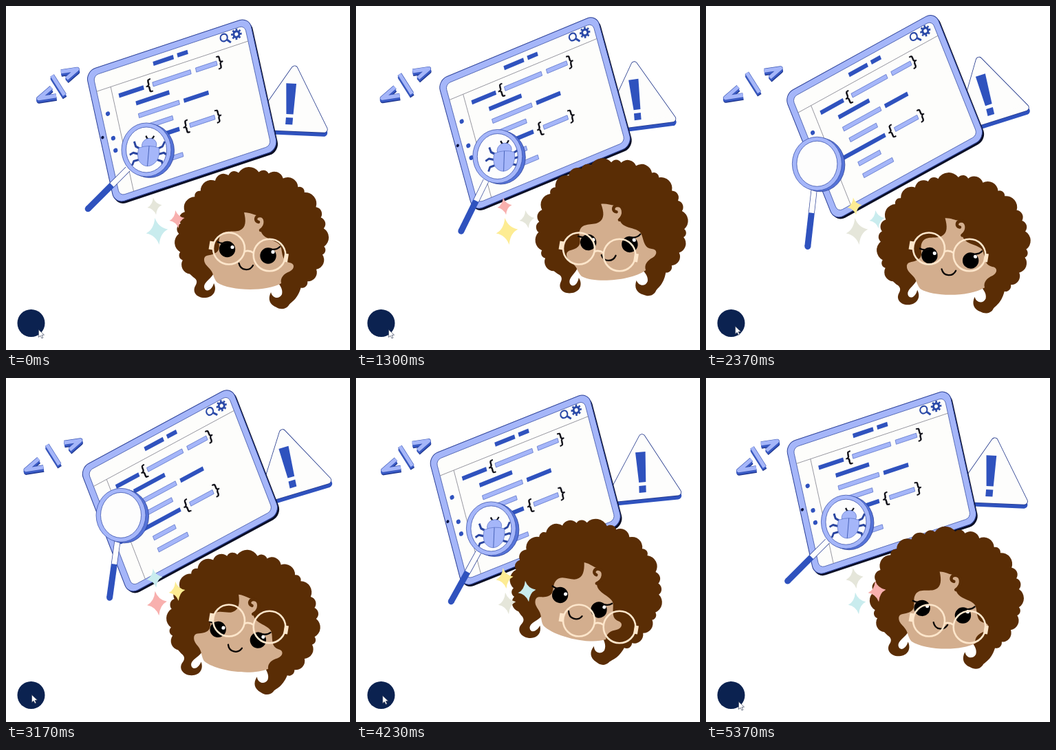
Write an HTML page that moves like this. It is 500x500 px and loops after 5.41 s.

```html
<!DOCTYPE html>
<html lang="en">
<head>
<meta charset="utf-8">
<title>Debugging</title>
<style>
  html, body { margin: 0; width: 100%; height: 100%; overflow: hidden; background: #fff; }
  svg { display: block; width: 100vw; height: 100vh; }
  .dark { fill: #2f52be; }
  .light { fill: #a5b6f9; stroke: #5a72c8; stroke-width: .7; }
  .line { fill: none; stroke: #8a8a94; stroke-width: .8; }
  .brace { font: 21px "DejaVu Sans", sans-serif; fill: #0c0c14; stroke: #0c0c14; stroke-width: .5; text-anchor: middle; }
  .icon { fill: none; stroke: #2b4aa8; }
  .leg { fill: none; stroke: #2b46a0; stroke-width: 3; stroke-linejoin: round; }
  .hair { fill: #5a2d05; }
  .ink { fill: none; stroke: #0a0706; stroke-width: 2.3; stroke-linecap: round; }
  .glasses { fill: none; stroke: #fde6cb; stroke-width: 2.6; }
</style>
</head>
<body>
<svg viewBox="0 0 500 500">
  <defs><clipPath id="view"><ellipse id="hole" rx="29.5" ry="33"/></clipPath></defs>

  <g id="sign" stroke-linejoin="round" stroke-width="10">
    <path d="M0 8L50 97H-50Z" fill="#2f52be" stroke="#2f52be"/>
    <path d="M0 7L50 92H-50Z" fill="#fdfdfc" stroke="#22388c"/>
    <path d="M0 7L50 92H-50Z" fill="#fdfdfc" stroke="#fdfdfc" stroke-width="8.4"/>
    <path fill="#2f52be" stroke="none" d="M-10 28H4.5L4 72H-6ZM-6 77H4V87H-6Z"/>
  </g>

  <g id="code" fill="none" stroke-linejoin="round" stroke-width="6.6"></g>

  <g id="tablet">
    <rect x=".5" y="2.5" width="250.5" height="197.5" rx="15" fill="#0b0f26"/>
    <rect x="-1" y="-1" width="250.5" height="197.5" rx="15" fill="#a5b6f9" stroke="#2a3f96" stroke-width="1"/>
    <rect x="8.5" y="8.5" width="232" height="179" rx="8" fill="#fdfdfb" stroke="#4a5fae" stroke-width=".8"/>
    <path class="line" d="M8.5 32H240.5M30 32V187.5"/>
    <g id="rows"></g>
    <g class="dark"><circle cx="17.5" cy="68" r="3.2"/><circle cx="17.5" cy="104.5" r="3.2"/><circle cx="17" cy="122.5" r="3.2"/></g>
    <circle cx="2.5" cy="98.5" r="2.2" fill="#0b1440"/>
    <g class="icon">
      <circle cx="207" cy="16" r="5.2" stroke-width="2.2"/>
      <path d="M210.5 20L215.5 26" stroke-width="2.8"/>
      <circle cx="226" cy="17" r="4.2" stroke-width="3.2"/>
      <circle cx="226" cy="17" r="6.6" stroke-width="2.8" stroke-dasharray="2.592"/>
    </g>
  </g>

  <g id="handle">
    <path d="M0 38V71" stroke="#2a3f96" stroke-width="9"/>
    <path d="M0 37V71" stroke="#fdfdfd" stroke-width="7.6"/>
    <path d="M0 71V120" stroke="#2f52be" stroke-width="9"/>
    <circle cy="120" r="4.5" class="dark"/>
  </g>
  <g id="lens">
    <ellipse cx="4.5" cy="1.5" rx="36" ry="39" fill="#5573d8" stroke="#2a3f96" stroke-width=".8"/>
    <ellipse rx="36" ry="39" fill="#a5b6f9" stroke="#3b54ae" stroke-width=".8"/>
    <ellipse rx="29.5" ry="33" fill="#fdfdfd" stroke="#3b54ae" stroke-width=".8"/>
  </g>
  <g clip-path="url(#view)">
    <g id="bug">
      <g transform="translate(64 139) rotate(18)">
        <g id="legs"></g>
        <path d="M-6 -22Q-4 -17 -1 -17M6 -22Q4 -17 1 -17" fill="none" stroke="#10131f" stroke-width="2.4"/>
        <ellipse cy="-9" rx="11" ry="9.5" class="light"/>
        <path class="light" d="M-15 -5Q0 -10 15 -5Q18 5 13 14Q7 21 0 21Q-7 21 -13 14Q-18 5 -15 -5Z"/>
        <path d="M0 -7.5V21" stroke="#4560b8" stroke-width="1"/>
      </g>
    </g>
  </g>

  <g id="head">
    <path id="curls" class="hair"/>
    <path fill="#d3ae8e" d="M346 300C349 312 349 322 340 326C332 330 318 324 312 333C306 342 314 352 306 358C298 364 290 360 288 367C287 377 297 380 300 388C303 396 304 399 307 402C325 414 377 416 400 403C398 395 404 389 412 386C420 382 420 374 412 373C402 371 402 362 400 352C398 338 371 342 370 324C379 315 377 303 368 304C361 305 356 300 346 300Z"/>
    <path d="M370 326C380 319 378 305 369 305C362 305 361 313 367 314" fill="none" stroke="#5a2d05" stroke-width="4.5" stroke-linecap="round"/>
    <circle cx="321.5" cy="353.5" r="11.7"/><circle cx="381" cy="363" r="11.7"/>
    <path class="ink" d="M308 343Q313 346 320 344.5M384 353.5Q393 355 398 350"/>
    <g fill="#fff"><circle cx="329" cy="350.5" r="2.6"/><circle cx="388" cy="357.5" r="2.6"/></g>
    <path class="ink" d="M338.5 374C341 385 354 386 359 377"/>
  </g>

  <g class="glasses">
    <circle cx="324" cy="352.5" r="23"/><circle cx="383" cy="362" r="23.3"/>
    <path d="M346.5 357Q353 354 360 359"/>
    <path d="M299.5 342L297.5 354M408 360L406 372" stroke-width="6"/>
  </g>

  <g id="sparks"></g>

  <circle cx="36.5" cy="461" r="20" fill="#0b2250"/>
  <path id="cursor" d="M0 0L0 11L2.6 8.8L4.6 12.6L6.4 11.7L4.5 8L8 7.6Z" fill="#fff" stroke="#39435c" stroke-width=".7"/>
</svg>

<script>
const T = 5410, TAU = 2 * Math.PI;
const $ = id => document.getElementById(id);
const place = (el, value) => el.setAttribute('transform', value);
const rad = deg => deg * Math.PI / 180;
const clamp = v => Math.max(0, Math.min(1, v));
const smooth = v => v * v * (3 - 2 * v);

// Mean plus cosine and sine parts of the first harmonics of the loop.
const wave = (t, mean, ...parts) => parts.reduce((sum, p, i) => {
  const angle = TAU * t / T * (1 + (i >> 1));
  return sum + p * (i % 2 ? Math.sin(angle) : Math.cos(angle));
}, mean);

// Smooth curve through rows of [time, ...values].
function track(rows, t) {
  const at = i => rows[Math.max(0, Math.min(rows.length - 1, i))];
  const i = Math.max(0, rows.findLastIndex(r => r[0] <= t));
  const [p, a, b, q] = [at(i - 1), at(i), at(i + 1), at(i + 2)];
  const h = b[0] - a[0];
  if (!h) return a.slice(1);
  const s = (t - a[0]) / h, e = smooth(s);
  return a.slice(1).map((v, j) => {
    const k = j + 1;
    const m = (b[k] - p[k]) / (b[0] - p[0]) * h;
    const n = (q[k] - v) / (q[0] - a[0]) * h;
    return v + (b[k] - v) * e + s * (1 - s) * (m * (1 - s) - n * s);
  });
}

// Head: time, point between the eyes, tilt
const HEAD = [
  [0, 351.5, 358.5, 8.7], [300, 366, 350, 3], [830, 339, 342.5, 18.7], [1400, 372, 346, 0],
  [1770, 358, 349, 5.9], [2370, 355, 366.5, 6.7], [2860, 377, 371, -1],
  [3170, 337.5, 373.5, 14.7], [3650, 371, 350, 1], [4230, 325, 326.5, 20.6], [5370, 344, 340, 9.8]];

// Code lines at an even pitch; each bar is a start and a length.
const bar = (cls, x, y, w) => `<rect class="${cls}" x="${x}" y="${y - 3}" width="${w}" height="6.2"/>`;
const brace = (c, x, y) => `<text class="brace" x="${x}" y="${y + 6.5}">${c}</text>`;
const LINES = [
  { dark: [39, 38], light: [91, 58, 157, 32], braces: [85, 194] },
  { dark: [61, 51] },
  { light: [61, 62], dark: [130, 38] },
  { light: [64, 45] },
  { dark: [45, 70], light: [131, 38], braces: [125, 175] },
  { light: [63, 36] },
  { light: [63, 49] }];
$('rows').innerHTML = bar('dark', 98, 19.5, 31) + bar('dark', 135, 19, 16) +
  LINES.map(({ dark = [], light = [], braces = [] }, i) => {
    const y = 48 + 18.5 * i;
    const bars = (cls, list) => list.map((x, j) => j % 2 ? '' : bar(cls, x, y, list[j + 1])).join('');
    return bars('dark', dark) + bars('light', light) + braces.map((x, j) => brace('{}'[j], x, y)).join('');
  }).join('');

$('legs').innerHTML = [1, -1].map(s =>
  `<path class="leg" transform="scale(${s} 1)" d="M14 -4L20 -7L23 -14M15 4L23 2L28 5M14 12L21 14L23 20"/>`).join('');

// Hair: uneven scallops round an ellipse, then the two hooked ends.
function hairPath(count = 23) {
  let d = '', px, py;
  for (let i = 0; i <= count; i++) {
    const angle = rad(148 + 262 * (i + .22 * Math.sin(2.4 * i)) / count);
    const x = 357 + 106 * Math.cos(angle), y = 338 + 97 * Math.sin(angle);
    const r = Math.hypot(x - px, y - py) * .6;
    d += i ? `A${r} ${r} 0 0 1 ${x} ${y}` : `M${x} ${y}`;
    [px, py] = [x, y];
  }
  return d + 'C423 428 414 430 411 435C406 442 398 441 393 438C383 434 380 426 385 416C387 425 397 427 401 419' +
    'C403 411 397 405 394 400L390 380H312L301 390C297 397 287 402 288 409C290 417 299 414 302 403' +
    'C307 413 302 423 290 424C278 425 270 416 275 407C279 401 277 397 272 394Z';
}
$('curls').setAttribute('d', hairPath());

// Code sign: three strokes that slide apart, each as a stack of layers.
const GLYPHS = [
  ['M46 117.5L27.5 133.5L53 129.5', 20, 1],
  ['M59 97L77 125.5', 8, 4],
  ['M85 94L108.5 90.5L93 104', -5, 1.5]];
$('code').innerHTML = GLYPHS.map(([d]) => '<g>' +
  `<path d="${d}" stroke="#223a92" transform="translate(.5 4)"/><path d="${d}" stroke="#3a5cc8" transform="translate(0 2.5)"/>` +
  `<path d="${d}" stroke="#3a56b4"/><path d="${d}" stroke="#a5b6f9" stroke-width="5.4"/></g>`).join('');
const glyphs = [...$('code').children];

// Sparkles: x, y, half width, half height, growth at the turn, first colour
const TINTS = ['#e5e6da', '#c9ecee', '#f8b0ae', '#fdec93'];
const SPARKS = [[216, 291, 10.5, 12.5, .2, 0], [248.5, 310, 11, 13, .18, 2], [219.5, 327.5, 15.8, 19.5, -.2, 1]];
$('sparks').innerHTML = SPARKS.map(() =>
  '<path d="M-.2 -1Q.12 -.28 1 -.15Q.28 .15 .2 1Q-.12 .28 -1 .15Q-.28 -.15 -.2 -1Z"/>').join('');
const sparks = [...$('sparks').children];

function draw(t) {
  const w = (...parts) => wave(t, ...parts);

  const a = rad(w(-23.4, 5.5, 0, -.5)), b = rad(w(16.5, -5, 0, .9));
  const board = `matrix(${Math.cos(a)} ${Math.sin(a)} ${Math.sin(b)} ${Math.cos(b)} ` +
    `${w(113.4, 2.4, 7, 1)} ${w(114, -18.3, -4)})`;
  place($('tablet'), board);
  place($('bug'), board);

  const lx = w(190, 23, 5, -9, 4), ly = w(215, -3, 6, -3, -11, 0, 4);
  place($('lens'), `translate(${lx} ${ly})`);
  place($('handle'), `translate(${lx} ${ly + 1}) rotate(${w(25, 20)})`);
  $('hole').setAttribute('cx', lx);
  $('hole').setAttribute('cy', ly);

  // Sign corners: apex, right, left
  const ax = w(408, 12, -5), ay = w(78, 6.5);
  const rx = w(473, -3, -4), ry = w(170, 18);
  const qx = w(358, -6, -3), qy = w(186, -3);
  place($('sign'), `matrix(${(rx - qx) / 116} ${(ry - qy) / 116} ${(rx + qx - 2 * ax) / 200} ${(ry + qy - 2 * ay) / 200} ${ax} ${ay})`);

  const sway = w(.5, .5);
  GLYPHS.forEach(([, dx, dy], i) => place(glyphs[i], `translate(${dx * sway} ${dy * sway})`));

  const [hx, hy, tilt] = track(HEAD, t);
  place($('head'), `translate(${hx} ${hy}) rotate(${tilt - 8.7}) translate(-351.5 -358.5)`);

  const beat = t / (T / 9);
  const pulse = ((1 - Math.cos(Math.PI * beat)) / 2) ** 4;
  SPARKS.forEach(([x, y, sw, sh, grow, tint], i) => {
    const s = 1 + grow * pulse;
    place(sparks[i], `translate(${x} ${y}) scale(${sw * s} ${sh * s})`);
    sparks[i].setAttribute('fill', TINTS[(tint + Math.floor(beat)) % 4]);
  });

  // The pointer darts in, rests, and eases out four times per loop.
  const p = t / (T / 4) % 1;
  const off = clamp(1 - p / .2) ** 2 + smooth(clamp((p - .55) / .4));
  place($('cursor'), `translate(${37.5 + 10 * off} ${460.5 + 10 * off})`);
}

function tick() {
  draw(performance.now() % T);
  requestAnimationFrame(tick);
}
tick();
</script>
</body>
</html>
```
